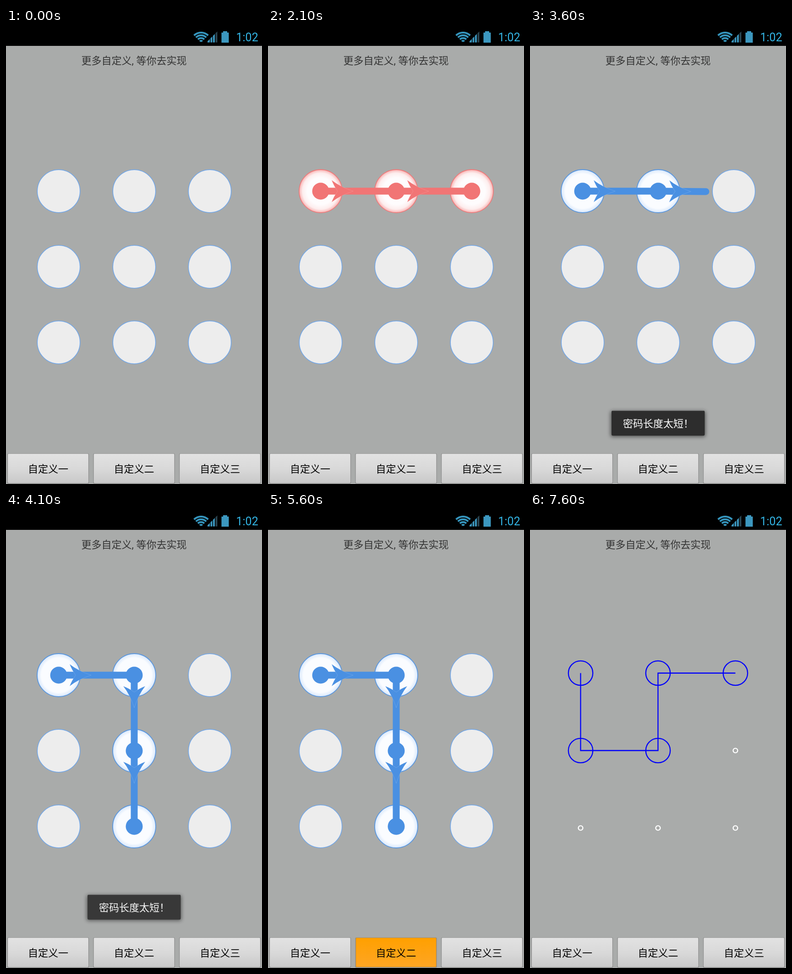
Write an HTML page that moves like this. It is 559 by 995 pixels and loops after 8 s.

```html
<!DOCTYPE html>
<html lang="zh-CN">
<head>
<meta charset="utf-8">
<title>Pattern lock</title>
<style>
  html, body { margin: 0; width: 100%; height: 100%; overflow: hidden; background: #a9abaa; }
  svg { display: block; width: 100vw; height: 100vh; }
  text { font: 22px Roboto, "Noto Sans CJK SC", "Noto Sans CJK", sans-serif; text-anchor: middle; }
  .wide { font-family: "Noto Sans CJK JP", "Noto Sans CJK", sans-serif; }
  .clock { font-size: 25px; fill: #33b5e5; text-anchor: start; }
  .idle { fill: #ededed; stroke: #6fa6ea; stroke-width: 1.5; }
  .blue { --ink: #4a90e2; }
  .red { --ink: #f17575; }
  .on { stroke: var(--ink); stroke-width: 1.8; stroke-opacity: .85; }
  .blue .on { fill: url(#glowBlue); }
  .red .on { fill: url(#glowRed); }
  .link { fill: none; stroke: var(--ink); stroke-width: 15; stroke-linecap: round; stroke-linejoin: round; }
  .arrow, .dot { fill: var(--ink); }
  .arrow { stroke: #fff; stroke-opacity: .15; stroke-width: 1; }
  .small { fill: none; stroke: #fff; stroke-width: 2.4; }
  .ring, .thin { fill: none; stroke: #0000fa; stroke-width: 2.3; }
</style>
</head>
<body>
<svg viewBox="0 0 559 995" preserveAspectRatio="none">
  <defs>
    <radialGradient id="glowBlue">
      <stop offset=".8" stop-color="#fafcff"/><stop offset="1" stop-color="#d9e8fb"/>
    </radialGradient>
    <radialGradient id="glowRed">
      <stop offset=".62" stop-color="#fefcfd"/><stop offset=".84" stop-color="#fdeeee"/><stop offset="1" stop-color="#f8b4b4"/>
    </radialGradient>
    <linearGradient id="face" x2="0" y2="1">
      <stop stop-color="#e2e2e2"/><stop offset=".5" stop-color="#d9d9d9"/><stop offset="1" stop-color="#c9c9c9"/>
    </linearGradient>
    <linearGradient id="pressed" x2="0" y2="1">
      <stop stop-color="#ffa000"/><stop offset="1" stop-color="#fea524"/>
    </linearGradient>
    <filter id="soft" x="-10%" y="-30%" width="120%" height="160%"><feGaussianBlur stdDeviation="4"/></filter>
  </defs>

  <rect width="559" height="995" fill="#a9abaa"/>
  <rect width="559" height="39"/>
  <g id="wifi" fill="none" stroke="#3595bd" stroke-width="4"></g>
  <g fill="#3c97bf">
    <path d="M440 31.500V29L445 24V31.500ZM446.500 31.500V22.500L450.500 18.500V31.500ZM452 31.500V17L456 13V31.500Z"/>
    <path d="M457.500 31.500V11.500L461.500 7.500V31.500Z" fill="#2b4652"/>
    <path d="M474 7H483V10H486.500V32H470.500V10H474Z"/>
  </g>
  <text class="clock" x="502.500" y="29">1:02</text>
  <text x="279.500" y="79" fill="#333">更多自定义, 等你去实现</text>

  <g id="view"></g>

  <g id="toast">
    <rect x="176" y="836" width="207" height="56" rx="4" opacity=".5" filter="url(#soft)"/>
    <rect x="178" y="835" width="203.500" height="54.500" rx="3" fill="#2d2d2d"/>
    <path d="M180 835.500H379.500" stroke="#4a4a4a"/>
    <text x="280" y="870.500" fill="#fff">密码长度太短<tspan class="wide">！</tspan></text>
  </g>
  <g id="buttons"></g>
</svg>

<script>
const LOOP = 8000;
const $ = id => document.getElementById(id);

// [start ms, visited nodes, finger x, finger y]
const SCENES = [
  [0, ''], [800, '0'], [1000, '0', 172, 355], [1100, '0', 211, 354],
  [1300, '01'], [1500, '01', 345, 353], [1600, '01', 395, 351],
  [1700, '012'], [1800, '012', 498, 348], [2100, '012'], [2500, ''],
  [3500, '0'], [3600, '01', 384, 357], [3800, '01', 337, 433],
  [3900, '014'], [4000, '014', 276, 630], [4100, '0147'],
  [5700, ''], [6400, '0'], [6600, '0', 110.5, 440], [6700, '03'], [6900, '034'],
  [7100, '034', 279.5, 430], [7200, '0341'], [7500, '0341', 365, 351.5], [7600, '03412']
];
// [start ms, toast opacity]
const FADES = [[0, 0], [2200, .3], [2300, .65], [2400, .9], [2500, 1],
  [4100, .91], [4200, .65], [4300, .3], [4400, 0]];

const at = (list, t) => list.findLast(step => step[0] <= t);
const grid = (x, y, gap) => Array.from({ length: 9 },
  (_, i) => [x + i % 3 * gap, y + Math.floor(i / 3) * gap]);
const BIG = grid(115, 356, 165);
const THIN = grid(110.5, 351.5, 169);

const circle = (cls, [x, y], r) => `<circle class="${cls}" cx="${x}" cy="${y}" r="${r}"/>`;
const line = (cls, pts) => pts.length > 1 ? `<path class="${cls}" d="M${pts.join('L')}"/>` : '';

function arrow([x, y], [toX, toY]) {
  const angle = Math.atan2(toY - y, toX - x) * 180 / Math.PI;
  return `<path class="arrow" transform="translate(${x} ${y}) rotate(${angle})"
    d="M24 -24Q43 -9 71 0Q43 9 24 24Q29 11 37 0Q29 -11 24 -24Z"/>`;
}

function bigView(seen, pts, tone) {
  const nodes = BIG.map((p, i) => seen.includes(i) ? circle('on', p, 47) : circle('idle', p, 46.7));
  const arrows = pts.slice(1).map((p, i) => arrow(pts[i], p));
  const dots = [...seen].map(i => circle('dot', BIG[i], 18.5));
  return `<g class="${tone}">${nodes.join('')}${line('link', pts)}${arrows.join('')}${dots.join('')}</g>`;
}

function thinView(seen, pts) {
  const nodes = THIN.map((p, i) => seen.includes(i) ? circle('ring', p, 26.7) : circle('small', p, 4.9));
  return nodes.join('') + line('thin', pts);
}

$('wifi').innerHTML = [22, 16, 10, 4].map(r => {
  const dx = r * .7, y = 32 - r * .714;
  return `<path d="M${426 - dx} ${y}A${r} ${r} 0 0 1 ${426 + dx} ${y}"/>`;
}).join('');

$('buttons').innerHTML = ['一', '二', '三'].map((n, i) => {
  const x = 4 + i * 187.6;
  return `<rect x="${x - 1}" y="928.5" width="178" height="66" rx="2" fill="#777" opacity=".65"/>
    <rect class="face" x="${x + .5}" y="929.5" width="175" height="63" rx="1" fill="url(#face)" stroke="#ececec" stroke-opacity=".6"/>
    <text x="${x + 88}" y="970">自定义${n}</text>`;
}).join('');
const middle = document.querySelectorAll('.face')[1];

let shown;
function draw(now) {
  const t = now % LOOP;
  const scene = at(SCENES, t);
  if (scene !== shown) {
    shown = scene;
    const [start, seen, x, y] = scene;
    const thin = start >= 5700;
    const pts = [...seen].map(i => (thin ? THIN : BIG)[i]);
    if (x) pts.push([x, y]);
    $('view').innerHTML = thin ? thinView(seen, pts) : bigView(seen, pts, start === 2100 ? 'red' : 'blue');
  }
  $('toast').setAttribute('opacity', at(FADES, t)[1]);
  const down = t >= 5600 && t < 5700;
  middle.setAttribute('fill', down ? 'url(#pressed)' : 'url(#face)');
  middle.setAttribute('stroke', down ? '#f59a08' : '#ececec');
}

const origin = performance.now();
function tick() {
  draw(performance.now() - origin);
  requestAnimationFrame(tick);
}
tick();
</script>
</body>
</html>
```
